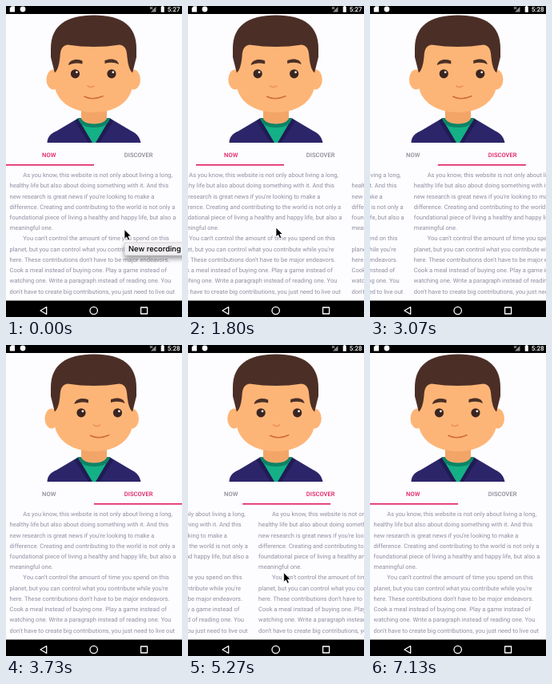
An HTML page that plays this animation: 220 by 389 pixels, repeating every 7.39 s.

```html
<!DOCTYPE html>
<html lang="en">
<head>
<meta charset="utf-8">
<title>Tabs with a turning face</title>
<style>
  html, body { margin: 0; width: 100%; height: 100%; overflow: hidden; background: #fdfcff; }
  svg { display: block; width: 100vw; height: 100vh; }
  text { font-family: Roboto, sans-serif; text-rendering: geometricPrecision; white-space: pre; }
  .body { font-size: 7.57px; fill: #918fa0; }
  .tab { font-size: 7.6px; font-weight: 500; text-anchor: middle; }
  .tip { font-family: Inter, sans-serif; font-size: 9.4px; font-weight: 500; fill: #000; }
</style>
</head>
<body>
<svg viewBox="0 0 220 389" preserveAspectRatio="none">
  <defs>
    <filter id="soft" x="-20%" y="-50%" width="140%" height="250%"><feGaussianBlur stdDeviation="3"/></filter>
  </defs>
  <rect width="220" height="389" fill="#fdfcff"/>

  <g id="avatar">
    <g id="ears" fill="#fdb577">
      <ellipse cx="59" cy="92" rx="8.5" ry="12.5"/>
      <ellipse cx="159.5" cy="92" rx="8.5" ry="12.5"/>
    </g>
    <path d="M51.5 171C52 164 55 160 63 156.5L90 140.5H130L157 156.5C164 160 167 164 168.5 171Z" fill="#2c2569"/>
    <path d="M90 140.5L86 144L103 171H117L134 144L130 140.5Z" fill="#211b55"/>
    <path d="M90 140.5L108 171H112L130 140.5Z" fill="#14b086"/>
    <path d="M90 140.5Q93 152 110 152T130 140.5Z" fill="#0c8467"/>
    <path d="M94 122H126V141Q122 147.5 110 147.5T94 141Z" fill="#f3a568"/>
    <path d="M61 84L56 64V53C56 25 75 11.5 110 11.5S163 25 163 53V64L158 84Z" fill="#4b2f27"/>
    <path d="M60.5 84Q66 80 67.5 64C68 53 71 49.5 77 48.5Q110 53.5 142 48.5C148 49.5 151 53 151.5 64Q153 80 158.5 84V98C156 122 134 133 110 133C86 133 63 122 60.5 98Z" fill="#fdb577"/>
    <g id="face">
      <g fill="#4b2f27">
        <path d="M78 74C79 67 88 65.5 95.5 68.5V72.5C89 70.5 83 71.5 78 74Z"/>
        <path d="M141 73C140 66 131 65 123.5 68V72C130 70 136 70.5 141 73Z"/>
      </g>
      <g fill="none" stroke-linecap="round">
        <path d="M102 100Q106 103 110 100" stroke="#ee965a" stroke-width="1.8"/>
        <path d="M98 113.3Q108 118.5 121 112.7" stroke="#d06c3a" stroke-width="1.6"/>
      </g>
      <g fill="#3b2521"><circle cx="86.5" cy="84.8" r="5.6"/><circle cx="132" cy="84.8" r="5.6"/></g>
      <g fill="#fff"><circle cx="88.4" cy="82.8" r="1.4"/><circle cx="133.9" cy="82.8" r="1.4"/></g>
    </g>
  </g>

  <text id="now" class="tab" x="53.7" y="189">NOW</text>
  <text id="discover" class="tab" x="165.7" y="189">DISCOVER</text>
  <rect id="bar" y="198" width="110" height="1.6" fill="#e01b61"/>
  <g id="pages"></g>

  <rect width="220" height="10" fill="#000"/>
  <g fill="#fff">
    <path d="M6.8 .3H11V7.5H4.8V2.4Z"/>
    <circle cx="21" cy="4" r="3.4"/>
    <path d="M187.5 .8V7.5H181Z" opacity=".55"/>
    <path d="M193.7 .8H194.7V0H196.8V.8H197.8V7.8H193.7Z"/>
    <text id="clock" x="201.8" y="7" font-size="8" font-weight="500"></text>
  </g>
  <path d="M180 1L183 4M183 1L180 4" stroke="#fff" stroke-width=".8"/>

  <rect y="368.5" width="220" height="20.5" fill="#000"/>
  <g fill="none" stroke="#fff" stroke-width="1.3" stroke-linejoin="round">
    <path d="M50.7 376.5V385.5L43 381Z"/>
    <circle cx="109.7" cy="381" r="4.7"/>
    <rect x="168.6" y="377" width="8" height="8"/>
  </g>

  <g id="tip">
    <rect x="148" y="300" width="80" height="16" fill="#000" opacity=".4" filter="url(#soft)"/>
    <rect x="148" y="296" width="80" height="16" fill="#f1eff1" stroke="#c9c7ca" stroke-width=".7"/>
    <text class="tip" x="153" y="307.4">New recording</text>
  </g>
  <path id="cursor" d="M0 0V11.8L2.7 9.4L4.7 13.6L6.8 12.7L4.9 8.5H8.5Z" fill="#000" stroke="#fff" stroke-width=".8"/>
</svg>

<script>
const LOOP = 7390, FPS = 15, LAST = 7133, WIDTH = 220;
const PINK = '#e01b61', GREY = '#8b8994';
const LINES = [
  "As you know, this website is not only about living a long,",
  "healthy life but also about doing something with it. And this",
  "new research is great news if you're looking to make a",
  "difference. Creating and contributing to the world is not only a",
  "foundational piece of living a healthy and happy life, but also a",
  "meaningful one.",
  "You can't control the amount of time you spend on this",
  "planet, but you can control what you contribute while you're",
  "here. These contributions don't have to be major endeavors.",
  "Cook a meal instead of buying one. Play a game instead of",
  "watching one. Write a paragraph instead of reading one. You",
  "don't have to create big contributions, you just need to live out"
];

// Key points: [ms, value]
const PAGE = [[0, 0], [1250, 0], [1800, .091], [2270, .318], [3070, .773], [3400, .94],
  [3750, 1], [4500, 1], [4800, .9], [5670, .35], [6100, .11], [6450, 0], [LOOP, 0]];
const CURSOR_X = [[0, 148], [1000, 148], [1350, 131], [1800, 110], [2270, 55], [3070, -40],
  [3650, -40], [4100, 42], [4500, 42], [4800, 63], [5670, 175], [6070, 224], [6470, 240], [LOOP, 240]];
const CURSOR_Y = [[0, 279.5], [1000, 279.5], [1800, 277], [2270, 267], [3070, 267],
  [4100, 284], [4800, 283], [5670, 286], [LOOP, 286]];

const $ = id => document.getElementById(id);
const shift = (id, x, y = 0) => $(id).setAttribute('transform', `translate(${x.toFixed(2)} ${y.toFixed(2)})`);

// Smooth curve through the key points that never overshoots them
function curve(keys) {
  const slope = keys.slice(1).map(([t, v], i) => (v - keys[i][1]) / (t - keys[i][0]));
  const tangent = keys.map((_, i) => {
    const a = slope[i - 1], b = slope[i];
    return a * b > 0 ? 2 * a * b / (a + b) : 0;
  });
  return t => {
    let i = 0;
    while (i < keys.length - 2 && t >= keys[i + 1][0]) i++;
    const [t0, v0] = keys[i], [t1, v1] = keys[i + 1];
    const d = t1 - t0, u = (t - t0) / d, w = 1 - u;
    return v0 * w * w * (1 + 2 * u) + v1 * u * u * (3 - 2 * u)
      + d * u * w * (tangent[i] * w - tangent[i + 1] * u);
  };
}
const pageAt = curve(PAGE), cursorX = curve(CURSOR_X), cursorY = curve(CURSOR_Y);

for (const left of [0, WIDTH]) {
  LINES.forEach((line, i) => {
    const el = document.createElementNS('http://www.w3.org/2000/svg', 'text');
    el.setAttribute('class', 'body');
    el.setAttribute('x', left + (i % 6 ? 4.5 : 21.3));
    el.setAttribute('y', 214.1 + i * 13.23);
    el.textContent = line;
    $('pages').append(el);
  });
}

function draw(ms) {
  const t = Math.min(Math.floor((ms + 4) * FPS / 1000) * 1000 / FPS, LAST);
  const page = pageAt(t);
  shift('pages', -page * WIDTH);
  shift('bar', page * WIDTH / 2);
  shift('face', page * 7.5);
  shift('ears', page * -2);
  shift('cursor', cursorX(t), cursorY(t));
  $('now').setAttribute('fill', page < .5 ? PINK : GREY);
  $('discover').setAttribute('fill', page < .5 ? GREY : PINK);
  $('clock').textContent = t < 2050 ? '5:27' : '5:28';
  $('tip').setAttribute('opacity', Math.max(0, 1 - t / 200));
}

let start;
function tick(now) {
  start ??= now;
  draw((now - start) % LOOP);
  requestAnimationFrame(tick);
}
draw(0);
requestAnimationFrame(tick);
</script>
</body>
</html>
```
